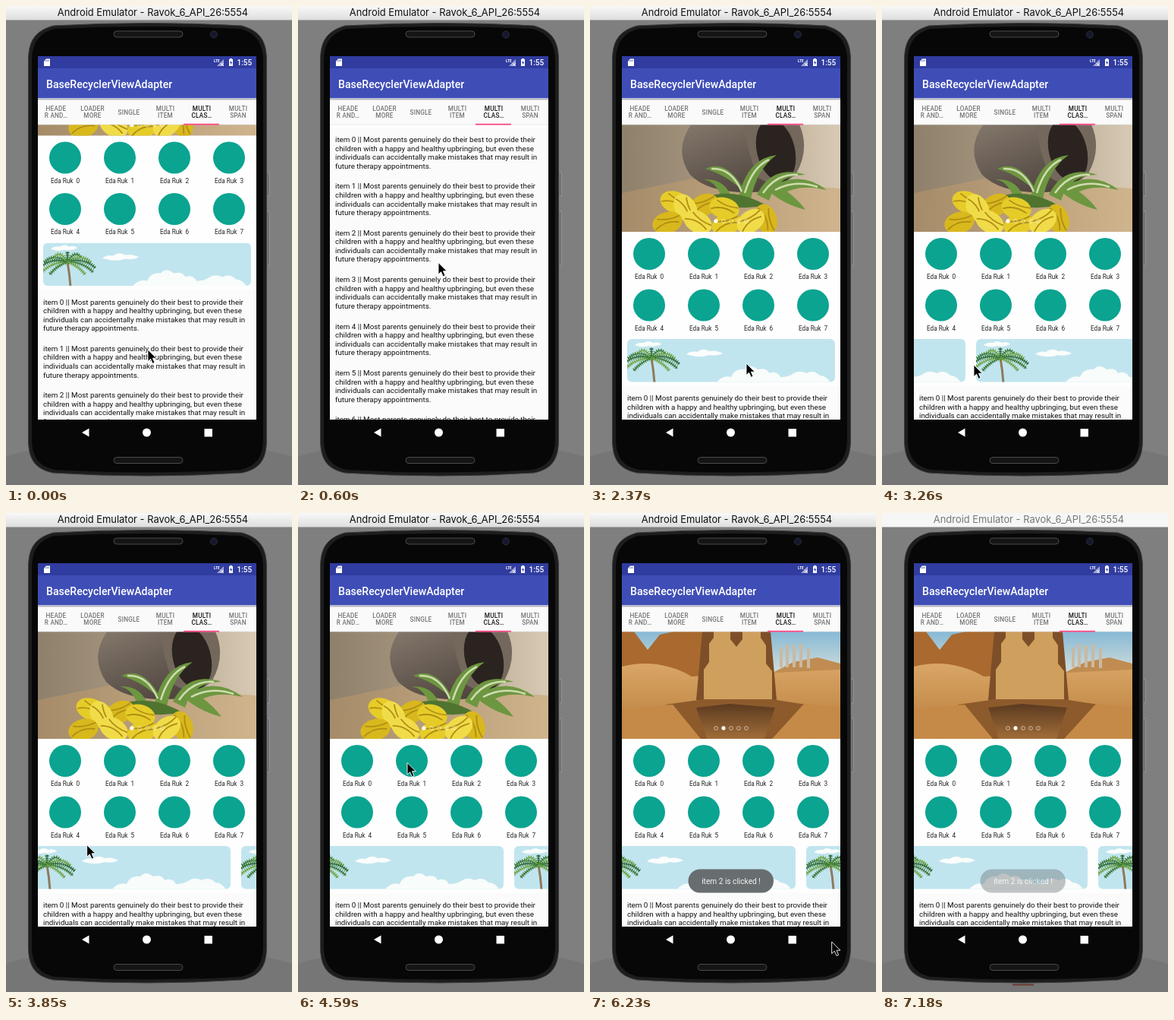
An HTML page that plays this animation: 377x630 px, repeating every 7.28 s.

```html
<!DOCTYPE html>
<html lang="en">
<head>
<meta charset="utf-8">
<title>List demo</title>
<style>
html, body { margin: 0; width: 100%; height: 100%; overflow: hidden; background: #7f7f7f; }
svg { display: block; width: 377px; height: 630px; font-family: Roboto, sans-serif; }
#title { font: 12.9px Inter, sans-serif; }
.mid { text-anchor: middle; }
.tab { font-size: 8.2px; font-weight: 500; letter-spacing: .2px; fill: #757575; }
.tab.on { fill: #181818; }
.label { font-size: 8.2px; fill: #222; }
.item { font-size: 9.83px; fill: #111; }
</style>
</head>
<body>
<svg viewBox="0 0 377 630">
  <defs>
    <linearGradient id="bar" x2="0" y2="1"><stop stop-color="#f8f8f8"/><stop offset="1" stop-color="#dedede"/></linearGradient>
    <linearGradient id="wall"><stop stop-color="#8f806b"/><stop offset=".4" stop-color="#a5957e"/><stop offset="1" stop-color="#d8cab4"/></linearGradient>
    <linearGradient id="table"><stop stop-color="#a58b68"/><stop offset="1" stop-color="#cfb48d"/></linearGradient>
    <linearGradient id="pot" x2=".7" y2="1"><stop stop-color="#84786c"/><stop offset="1" stop-color="#4d433c"/></linearGradient>
    <linearGradient id="sky" x2="0" y2="1"><stop stop-color="#86b9d6"/><stop offset=".4" stop-color="#d6dfda"/></linearGradient>
    <linearGradient id="sand" x2="0" y2="1"><stop stop-color="#d9a665"/><stop offset="1" stop-color="#b87c3c"/></linearGradient>
    <linearGradient id="pit" x2="0" y2="1"><stop stop-color="#5b3a20"/><stop offset="1" stop-color="#a06d38"/></linearGradient>
    <clipPath id="view"><path d="M42 156H330V544H42z"/></clipPath>
    <clipPath id="photoBox"><path d="M42 156H330V297H42z"/></clipPath>
    <clipPath id="cardBox"><rect width="274" height="56.5" rx="6"/></clipPath>
    <g id="card" clip-path="url(#cardBox)">
      <path d="M0 0H274V57H0z" fill="#c1e5ef"/>
      <path d="M10 8Q15 4 22 5Q28 1 34 5Q42 3 45 7Q36 11 28 9Q20 12 10 8zM78 20Q84 15 92 17Q100 11 108 16Q118 14 126 19Q118 23 108 21Q96 26 78 20z" fill="#fafdfb"/>
      <path d="M118 57Q126 47 137 50Q142 38 155 40Q162 32 172 40Q184 37 187 45Q197 41 202 50Q212 50 218 46Q226 40 236 45Q246 40 254 48Q262 48 268 57z" fill="#f8fcfb"/>
      <g id="palm" fill="none"></g>
    </g>
  </defs>

  <path d="M0 0H377V630H0z" fill="#7f7f7f"/>
  <ellipse cx="188" cy="612" rx="215" ry="40" fill="#767676"/>
  <path id="titleBar" d="M0 0H377V18.5H0z"/>
  <text id="title" class="mid" x="193.5" y="13">Android Emulator - Ravok_6_API_26:5554</text>

  <path d="M345 219h2v31h-2M345 270h2v71h-2" fill="#666" stroke="#a3a3a3" stroke-width=".8"/>
  <path d="M29.500 72C29.500 46 38 33 62 26Q186 19 311 26C335 33 343.500 46 343.500 72V570C343.500 596 335 609 311 614Q186 622 62 614C38 609 29.500 596 29.500 570z" fill="#1d1d1d" stroke="#3b3b3b"/>
  <path d="M34 74C34 50 42 36 64 30Q186 24 309 30C331 36 339 50 339 74V568C339 592 331 605 309 610Q186 617 64 610C42 605 34 592 34 568z" fill="#070707"/>
  <g fill="#151515" stroke="#4a4a4a">
    <rect x="142" y="33" width="91" height="8" rx="4"/>
    <rect x="142" y="593.5" width="91" height="8" rx="4"/>
    <circle cx="274" cy="37.5" r="4.5" fill="#15182b" stroke="#2b2d3c"/>
  </g>
  <path id="glow" d="M172 620.500H200" stroke="#6b3a32" stroke-width="2"/>

  <path d="M42 66H330V544H42z" fill="#fbfbfb"/>
  <g clip-path="url(#view)">
    <g id="list">
      <path d="M42 297H330V500H42z" fill="#fefefe"/>
      <g clip-path="url(#photoBox)">
        <g id="photos">
          <g>
            <path d="M42 156H330V297H42z" fill="url(#wall)"/>
            <path d="M42 246L140 226L330 240V297H42z" fill="url(#table)"/>
            <path d="M133 156Q110 190 132 222Q160 250 230 244L270 222Q290 190 270 156z" fill="url(#pot)"/>
            <path d="M204 156Q206 190 222 226Q250 244 272 220Q290 188 276 156z" fill="#74685d"/>
            <ellipse cx="245" cy="190" rx="25" ry="42" transform="rotate(-14 245 190)" fill="#2b231f"/>
            <g fill="#6d9640">
              <path d="M152 214Q182 200 205 246Q180 222 152 214zM176 262Q170 232 150 228Q182 226 190 262z"/>
              <path d="M196 250Q208 200 246 196Q220 214 212 254zM220 248Q240 208 284 222Q246 222 236 256z"/>
              <path d="M236 240Q276 214 312 242Q270 232 248 252zM240 232Q268 246 284 268Q252 260 232 240z"/>
              <path d="M150 252Q190 238 232 262Q190 272 150 252z" fill="#4f7430"/>
            </g>
            <path d="M160 214Q186 212 200 244M204 246Q214 212 236 202M228 246Q246 220 274 222M244 242Q270 228 300 238" fill="none" stroke="#cfdcae" stroke-width="2.500"/>
            <g id="tulips"></g>
          </g>
          <g transform="translate(288)">
            <path d="M42 156H330V297H42z" fill="url(#sky)"/>
            <path d="M42 156H58L76 180L92 160L110 156H162V240H42z" fill="#a9692f"/>
            <path d="M237 212L268 196L300 190L330 198V218z" fill="#c08c52"/>
            <path d="M42 202Q90 190 134 215L330 206V297H42z" fill="url(#sand)"/>
            <path d="M252 203V177M260 203V172M269 203V174M278 203V172M288 204V178" stroke="#c9b9a2" stroke-width="4"/>
            <path d="M148 156H238L246 246H140z" fill="#7d4f28"/>
            <path d="M150 246V206L157 196V172L163 164V156H185V166L193 176L201 166V156H225V164L232 174V198L240 208V246z" fill="#cf9f5e"/>
            <path d="M100 252L150 245H240L292 253L272 297H120z" fill="#8d5a2c"/>
            <path d="M140 256L184 251L244 256L230 297H154z" fill="url(#pit)"/>
            <path d="M42 257L109 252L146 297H42zM330 255L282 251L240 297H330z" fill="#c58a48"/>
          </g>
        </g>
      </g>
      <g id="dots" stroke="#fff" stroke-opacity=".55"></g>
      <g id="icons"></g>
      <g id="cards"></g>
      <g id="items"></g>
    </g>
  </g>

  <path d="M42 66H330V82.500H42z" fill="#303c9f"/>
  <path d="M42 82H330V121.500H42z" fill="#3f4eb7"/>
  <path d="M42 121.500H330V156H42z" fill="#fafafa"/>
  <path d="M42 122.500H330" stroke="#b5b6c0" stroke-width="2"/>
  <path d="M42 156H330" stroke="#ddd" stroke-width=".7"/>
  <path d="M234 154.700H281V156.500H234z" fill="#f9437f"/>
  <g id="tabs"></g>
  <g fill="#fff">
    <path d="M53 69.500H58V79H50V72.500z"/>
    <path d="M52 73V71.500M54 73V71M56 73V71" stroke="#303c9f" stroke-width=".8"/>
    <text x="274" y="73.500" font-size="4.800" font-weight="700">LTE</text>
    <path d="M287 70V79H278z" opacity=".55"/>
    <path d="M283 75l4 4m0-4l-4 4" stroke="#fff" stroke-width=".8"/>
    <path d="M294 70h1v-1h3v1h1v9h-5z"/>
    <path d="M297 71.500L295 75h1.300v2.600L298.200 74H297z" fill="#303c9f"/>
    <text x="304.500" y="78" font-size="10" font-weight="500">1:55</text>
    <text x="53" y="107.500" font-size="14.100" font-weight="500">BaseRecyclerViewAdapter</text>
    <path d="M100 561L109.500 555.500V566.500z"/>
    <circle cx="185.500" cy="561" r="5.500"/>
    <path d="M261.500 556H272V566.500H261.500z"/>
  </g>

  <g id="toast">
    <rect x="129.500" y="468.500" width="112.500" height="31" rx="15.500" fill="#686e70"/>
    <text class="mid" x="186" y="487.500" font-size="10.150" fill="#f2f2f2">item 2 is clicked !</text>
  </g>
  <path id="cursor" d="M0 0V15.500L3.600 12.200L6.300 18.300L9 17.100L6.400 11.200H11.300z" fill="#000" stroke="#fff" stroke-width=".9"/>
</svg>

<script>
const LOOP = 7280, STEP = 148.2;
const $ = id => document.getElementById(id);
const repeat = (n, make) => Array.from({ length: n }, (_, i) => make(i)).join('');
const text = (cls, x, y, s) => `<text class="${cls}" x="${x}" y="${y}">${s}</text>`;
const move = (id, x, y) => $(id).setAttribute('transform', `translate(${x} ${y})`);

// Palm: a trunk and leafy fronds fanned around its crown
$('palm').innerHTML = '<path d="M36 58Q35 42 32 25" stroke="#8f7a5c" stroke-width="3"/>' +
  repeat(11, i => {
    const a = Math.PI * (1.28 - i * .156), x = 37 * Math.cos(a), y = -13 * Math.sin(a);
    const d = `M32 25Q${32 + x * .6} ${20 + y} ${32 + x} ${27 + y + Math.abs(x) * .2}`;
    const color = ['#3c7a37', '#6fa548', '#2f6b35'][i % 3];
    return `<path d="${d}" stroke="${color}" stroke-width="1.5"/>` +
      `<path d="${d}" stroke="${color}" stroke-width="5" stroke-dasharray="1.1 1.6"/>`;
  });

// Tulips: [x, y, tilt]
const tulips = [[112, 258, 20], [150, 262, -25], [126, 266, 60], [177, 266, 15], [102, 285, -15],
  [142, 284, 30], [180, 287, -20], [232, 280, 70], [212, 283, -35]];
$('tulips').innerHTML = tulips.map(([x, y, tilt], i) =>
  `<g transform="translate(${x} ${y}) rotate(${tilt})">
    <ellipse rx="20" ry="14" fill="${['#e6cc28', '#d8b81c', '#f0dc48'][i % 3]}"/>
    <path d="M-17 5Q-2 -4 15 3M-12 -8Q2 -2 18 -5" fill="none" stroke="#b08d16" stroke-width="1.800"/></g>`).join('');

$('cards').innerHTML = repeat(4, i => `<use href="#card" x="${49 + 288 * i}" y="438"/>`);

$('icons').innerHTML = repeat(8, i => {
  const x = 78 + i % 4 * 72, y = 326 + (i >> 2) * 67.5;
  return `<circle cx="${x}" cy="${y}" r="21" fill="#0aa491"/>` +
    text('label mid', x, y + 33, `Eda Ruk&nbsp; ${i}`);
});

const lines = ['Most parents genuinely do their best to provide their',
  'children with a happy and healthy upbringing, but even these',
  'individuals can accidentally make mistakes that may result in',
  'future therapy appointments.'];
$('items').innerHTML = repeat(10, i => lines.map((s, j) =>
  text('item', 49, 519 + i * 61.4 + j * 11.55, j ? s : `item ${i} || ${s}`)).join(''));

const tabs = ['HEADE|R AND…', 'LOADER|MORE', 'SINGLE', 'MULTI|ITEM', 'MULTI|CLAS…', 'MULTI|SPAN'];
$('tabs').innerHTML = tabs.map((s, i) => s.split('|').map((part, j, all) =>
  text(i === 4 ? 'tab mid on' : 'tab mid', 66 + 48 * i, (all.length > 1 ? 137.5 : 142.5) + j * 9.7, part)).join('')).join('');

$('dots').innerHTML = repeat(5, i => `<circle cx="${166 + 10 * i}" cy="283" r="2.400"/>`);

// Keys: [step, value, ...], linear between steps
const scroll = [[0, 126.5], [1, 140], [3, 290], [5, 390], [8, 430], [9, 405], [10, 355.5], [12, 190], [14, 50], [16, 0]];
const swipe = [[18, 0], [19, 20], [22, 213], [24, 290], [28, 340]];
const slide = [[32, 0], [33, .2], [35, .9], [36, 1]];
const pointer = [[0, 187, 452], [3, 184, 330], [5, 186, 345], [8, 187, 365], [10, 187, 428], [12, 190, 500],
  [16, 206, 470], [18, 300, 474], [19, 290, 474], [22, 121, 472], [24, 100, 470], [27, 110, 420],
  [30, 142, 330], [32, 146, 327], [33, 200, 330], [34, 222, 335], [36, 292, 437],
  [38, 306, 501], [40, 306, 501], [41, 310, 530], [44, 336, 632]];

function at(keys, k, n = 1) {
  const i = keys.findIndex(key => key[0] > k);
  if (i < 0) return keys[keys.length - 1][n];
  if (!i) return keys[0][n];
  const a = keys[i - 1], b = keys[i];
  return a[n] + (b[n] - a[n]) * (k - a[0]) / (b[0] - a[0]);
}

function draw(now) {
  const t = now % LOOP, k = Math.floor((t + 10) / STEP);
  const page = at(slide, k), blurred = t >= 6810;
  move('list', 0, -at(scroll, k));
  move('cards', -at(swipe, k), 0);
  move('photos', -288 * page, 0);
  move('cursor', at(pointer, k), at(pointer, k, 2));
  [...$('dots').children].forEach((dot, i) =>
    dot.setAttribute('fill', i === Math.round(page) ? '#fff' : 'none'));
  $('toast').setAttribute('opacity', k < 34 ? 0 : t < 7180 ? 1 : .4);
  $('titleBar').setAttribute('fill', blurred ? '#f6f6f6' : 'url(#bar)');
  $('title').setAttribute('fill', blurred ? '#777' : '#111');
  $('glow').setAttribute('opacity', blurred ? 1 : 0);
}

const start = performance.now();
function tick() {
  draw(performance.now() - start);
  requestAnimationFrame(tick);
}
tick();
</script>
</body>
</html>
```
